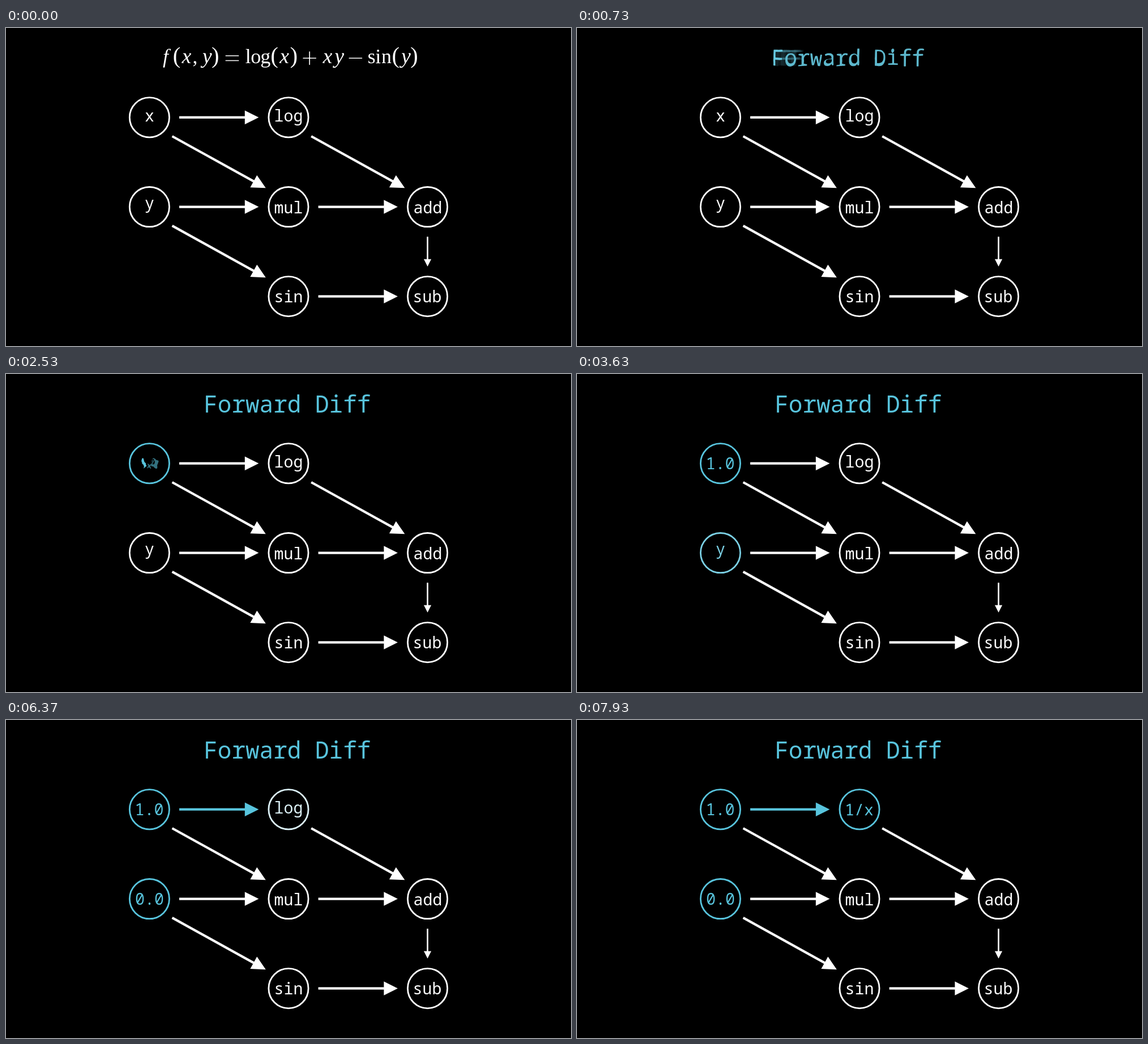
These frames come from a looping animation (998 px wide and 561 px high, 8 s). An HTML page with a canvas:

```html
<!DOCTYPE html>
<html lang="en">
<head>
<meta charset="utf-8">
<title>Forward Diff</title>
<style>
html, body { margin: 0; width: 100%; height: 100%; overflow: hidden; background: #000; }
canvas { display: block; }
</style>
</head>
<body>
<canvas id="stage" width="998" height="561"></canvas>
<script>
const ctx = document.getElementById('stage').getContext('2d');
const W = 998, H = 561, LOOP = 8000;
const UNIT = W / (128 / 9);
const RADIUS = UNIT / 2, BUFF = UNIT / 4;
const WHITE = [255, 255, 255], BLUE = [88, 196, 221];
const MONO = '"Noto Sans Mono", monospace';
const SERIF = '"Liberation Serif", serif';

const clamp = v => Math.min(1, Math.max(0, v));
const lerp = (a, b, k) => a + (b - a) * k;
const sigmoid = v => 1 / (1 + Math.exp(-v));
const EDGE = sigmoid(-5);
const smooth = v => clamp((sigmoid(10 * (clamp(v) - 0.5)) - EDGE) / (1 - 2 * EDGE));
const tint = k => `rgb(${WHITE.map((w, i) => Math.round(lerp(w, BLUE[i], k)))})`;
const point = (ux, uy) => ({ x: W / 2 + ux * UNIT, y: H / 2 - uy * UNIT });

// A glyph is a character at its baseline origin, or a set of bars
function paint(c, g, x = g.x, y = g.y) {
  if (g.bars) {
    for (const [bx, by, bw, bh] of g.bars) c.fillRect(x + bx, y + by, bw, bh);
  } else {
    c.font = g.font;
    c.fillText(g.ch, x, y);
  }
}

// Lay out a monospaced word with its ink centred on a point
function word(text, size, cx, cy) {
  const font = `${size}px ${MONO}`;
  ctx.font = font;
  const m = ctx.measureText(text);
  const x = cx - (m.actualBoundingBoxRight - m.actualBoundingBoxLeft) / 2;
  const y = cy + (m.actualBoundingBoxAscent - m.actualBoundingBoxDescent) / 2;
  const step = ctx.measureText('0').width;
  return [...text]
    .map((ch, i) => ({ ch, font, x: x + i * step, y }))
    .filter(g => g.ch !== ' ');
}

function formula(text, left, base, em) {
  const widths = {
    f: 0.598, x: 0.572, y: 0.526, ',': 0.278, '(': 0.389, ')': 0.389,
    '=': 1.334, '+': 1.222, '−': 1.222,
    l: 0.278, o: 0.5, g: 0.5, s: 0.394, i: 0.278, n: 0.556
  };
  const axis = -em / 4, len = em * 0.68, thick = 1.6;
  const bar = dy => [-len / 2, axis + dy - thick / 2, len, thick];
  const post = [-thick / 2, axis - len / 2, thick, len];
  const bars = { '=': [bar(-4.3), bar(4.3)], '+': [bar(0), post], '−': [bar(0)] };
  let x = left;
  return [...text].map(ch => {
    const mid = x + widths[ch] * em / 2;
    x += (widths[ch] + (ch === ',' ? 0.167 : 0)) * em;
    if (bars[ch]) return { bars: bars[ch], x: mid, y: base };
    const size = '()'.includes(ch) ? 41 : 'xy'.includes(ch) ? 38 : 36;
    const font = `${'fxy'.includes(ch) ? 'italic ' : ''}${size}px ${SERIF}`;
    ctx.font = font;
    const m = ctx.measureText(ch);
    return { ch, font, x: mid - (m.actualBoundingBoxRight - m.actualBoundingBoxLeft) / 2, y: base };
  });
}

// Outline tracing: follow the pixel edges of an enlarged glyph
const ZOOM = 6, BOX = 72, OX = 22, OY = 50, SAMPLES = 120;
const SIZE = BOX * ZOOM;
const DX = [1, 0, -1, 0], DY = [0, 1, 0, -1];
const pad = document.createElement('canvas');
pad.width = pad.height = SIZE;
const pen = pad.getContext('2d', { willReadFrequently: true });

function resample(raw) {
  const n = raw.length, reach = 3;
  const soft = raw.map((_, i) => {
    let x = 0, y = 0;
    for (let d = -reach; d <= reach; d++) {
      const p = raw[(i + d + n) % n];
      x += p[0];
      y += p[1];
    }
    return [x / (2 * reach + 1), y / (2 * reach + 1)];
  });
  return Array.from({ length: SAMPLES }, (_, s) => {
    const pos = s * n / SAMPLES, i = Math.floor(pos);
    const a = soft[i], b = soft[(i + 1) % n];
    return [lerp(a[0], b[0], pos - i) / ZOOM - OX, lerp(a[1], b[1], pos - i) / ZOOM - OY];
  });
}

function outline(g) {
  if (g.paths) return g.paths;
  pen.setTransform(1, 0, 0, 1, 0, 0);
  pen.clearRect(0, 0, SIZE, SIZE);
  pen.scale(ZOOM, ZOOM);
  paint(pen, g, OX, OY);
  const data = pen.getImageData(0, 0, SIZE, SIZE).data;
  const inside = (x, y) => x >= 0 && y >= 0 && x < SIZE && y < SIZE && data[(y * SIZE + x) * 4 + 3] > 127;
  const seen = new Uint8Array(SIZE * SIZE);
  const loops = [];
  for (let y = 0; y < SIZE; y++) {
    for (let x = 0; x < SIZE; x++) {
      if (seen[y * SIZE + x] || !inside(x, y) || inside(x, y - 1)) continue;
      const raw = [];
      let px = x, py = y, d = 0;
      do {
        if (d === 0) seen[py * SIZE + px] = 1;
        raw.push([px, py]);
        px += DX[d];
        py += DY[d];
        const r = (d + 1) % 4;
        // Pixels ahead of the corner, on the right and on the left
        const ax = px + (DX[d] + DX[r] - 1) / 2, ay = py + (DY[d] + DY[r] - 1) / 2;
        if (!inside(ax, ay)) d = r;
        else if (inside(ax - DX[r], ay - DY[r])) d = (d + 3) % 4;
      } while (px !== x || py !== y || d !== 0);
      if (raw.length > 12) loops.push(resample(raw));
    }
  }
  g.paths = loops.map(loop => loop.map(p => [p[0] + g.x, p[1] + g.y]));
  return g.paths;
}

function loopAt(paths, i) {
  if (paths[i]) return paths[i];
  const end = paths[paths.length - 1][SAMPLES - 1];
  return Array(SAMPLES).fill(end);
}

function morph(from, to, k, alpha) {
  const a = outline(from), b = outline(to);
  ctx.globalAlpha = alpha;
  ctx.beginPath();
  for (let i = 0; i < Math.max(a.length, b.length); i++) {
    const p = loopAt(a, i), q = loopAt(b, i);
    p.forEach((v, s) => ctx.lineTo === undefined ? 0
      : ctx[s ? 'lineTo' : 'moveTo'](lerp(v[0], q[s][0], k), lerp(v[1], q[s][1], k)));
    ctx.closePath();
  }
  ctx.fill();
  ctx.globalAlpha = 1;
}

// Letters without a partner grow out of the first one while fading in
function change(from, to, k) {
  if (k <= 0) from.forEach(g => paint(ctx, g));
  else if (k >= 1) to.forEach(g => paint(ctx, g));
  else to.forEach((g, i) => morph(from[i] || from[0], g, k, from[i] ? 1 : k));
}

function arrow(a, b, color) {
  const turn = Math.PI / 4;
  const out = Math.round(Math.atan2(b.y - a.y, b.x - a.x) / turn) * turn;
  const rx = RADIUS * Math.cos(out), ry = RADIUS * Math.sin(out);
  const dx = b.x - a.x - 2 * rx, dy = b.y - a.y - 2 * ry;
  const len = Math.hypot(dx, dy) - 2 * BUFF;
  const tip = Math.min(0.35 * UNIT, len / 4);
  const half = Math.min(0.06 * UNIT, len * 0.05) / 2;
  ctx.save();
  ctx.translate(a.x + rx, a.y + ry);
  ctx.rotate(Math.atan2(dy, dx));
  ctx.translate(BUFF, 0);
  ctx.fillStyle = color;
  ctx.fillRect(0, -half, len - tip + 0.5, half * 2);
  ctx.beginPath();
  ctx.moveTo(len, 0);
  ctx.lineTo(len - tip, -tip / 2);
  ctx.lineTo(len - tip, tip / 2);
  ctx.fill();
  ctx.restore();
}

const label = (text, p) => word(text, 28.3, p.x, p.y - (text.length === 1 ? 1 : 0));
function node(text, ux, uy, next) {
  const p = point(ux, uy);
  return { ...p, from: label(text, p), to: next && label(next, p) };
}

const nodes = {
  x: node('x', -3.5, 1.75, '1.0'),
  y: node('y', -3.5, -0.5, '0.0'),
  log: node('log', 0, 1.75, '1/x'),
  mul: node('mul', 0, -0.5),
  sin: node('sin', 0, -2.75),
  add: node('add', 3.5, -0.5),
  sub: node('sub', 3.5, -2.75)
};
const links = ['x log', 'x mul', 'y mul', 'y sin', 'log add', 'mul add', 'add sub', 'sin sub']
  .map(s => s.split(' '));
// Second at which each node turns blue; its label changes afterwards
const blueAt = { x: 1, y: 3, log: 6 };
const labelAt = { x: 2, y: 4, log: 7 };

const equation = formula('f(x,y)=log(x)+xy−sin(y)', 274, 62, 35);
const title = word('Forward Diff', 41, 498, 51.5);

function drawTitle(k) {
  ctx.fillStyle = tint(k);
  if (k <= 0) return equation.forEach(g => paint(ctx, g));
  change([equation[0]], title, k);
  if (k < 1) equation.slice(1).forEach(g => morph(g, title[0], k, 1 - k));
}

function draw(ms) {
  const t = ms / 1000;
  const stage = start => start === undefined ? 0 : smooth(t - start);
  ctx.fillStyle = '#000';
  ctx.fillRect(0, 0, W, H);
  drawTitle(stage(0));
  links.forEach(([a, b], i) => arrow(nodes[a], nodes[b], tint(i ? 0 : stage(5))));
  for (const [name, n] of Object.entries(nodes)) {
    const color = tint(stage(blueAt[name]));
    ctx.strokeStyle = ctx.fillStyle = color;
    ctx.lineWidth = 0.04 * UNIT;
    ctx.beginPath();
    ctx.arc(n.x, n.y, RADIUS, 0, Math.PI * 2);
    ctx.stroke();
    change(n.from, n.to, stage(labelAt[name]));
  }
}

// Trace the moving glyphs before the clock starts
[...equation, ...title].forEach(outline);
for (const n of Object.values(nodes)) if (n.to) [...n.from, ...n.to].forEach(outline);

const start = performance.now();
function tick() {
  draw((performance.now() - start) % LOOP);
  requestAnimationFrame(tick);
}
draw(0);
requestAnimationFrame(tick);
</script>
</body>
</html>
```
